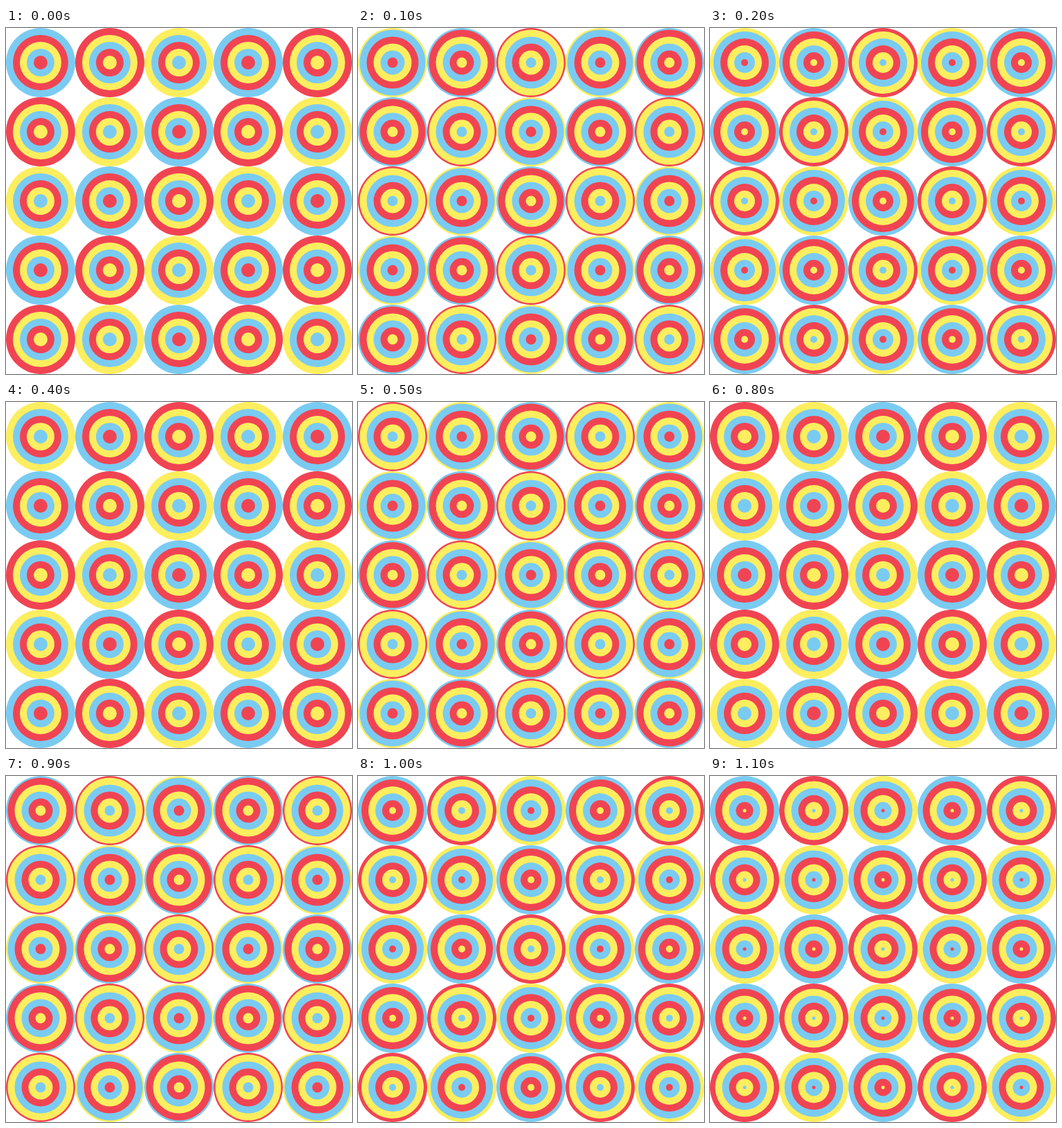
Recreate the animation shown at these times as an HTML page with a canvas. Size 500 by 500 pixels, loop 1200 ms.

```html
<!DOCTYPE html>
<html lang="en">
<head>
<meta charset="utf-8">
<title>Shrinking rings</title>
<style>
  html, body { margin: 0; width: 100%; height: 100%; overflow: hidden; background: #fff; }
  canvas { display: block; width: 500px; height: 500px; }
</style>
</head>
<body>
<canvas id="stage" width="500" height="500"></canvas>
<script>
const ctx = document.getElementById('stage').getContext('2d');
const COLORS = ['#7acbf2', '#f14453', '#fcee5e']; // from the outside inwards
const CELL = 100, RADIUS = 50, BAND = 10;
const LOOP = 1200, STEP = 100;
const SHRINK = 3 * BAND / LOOP; // one colour cycle per loop

function disc(x, y, r, color) {
  ctx.fillStyle = color;
  ctx.beginPath();
  ctx.arc(x, y, r, 0, Math.PI * 2);
  ctx.fill();
}

function target(x, y, phase, shrink) {
  const first = -Math.ceil(shrink / BAND);
  for (let i = first; ; i++) {
    const r = RADIUS - i * BAND - shrink;
    if (r <= 0) break;
    disc(x, y, Math.min(r, RADIUS), COLORS[(i + phase + 6) % 3]);
  }
}

function draw(time) {
  const shrink = Math.floor(time % LOOP / STEP) * STEP * SHRINK;
  ctx.fillStyle = '#fff';
  ctx.fillRect(0, 0, 500, 500);
  for (let row = 0; row < 5; row++) {
    for (let col = 0; col < 5; col++) {
      target((col + 0.5) * CELL, (row + 0.5) * CELL, row + col, shrink);
    }
  }
}

const start = performance.now();
function tick() {
  draw(performance.now() - start);
  requestAnimationFrame(tick);
}
tick();
</script>
</body>
</html>
```
